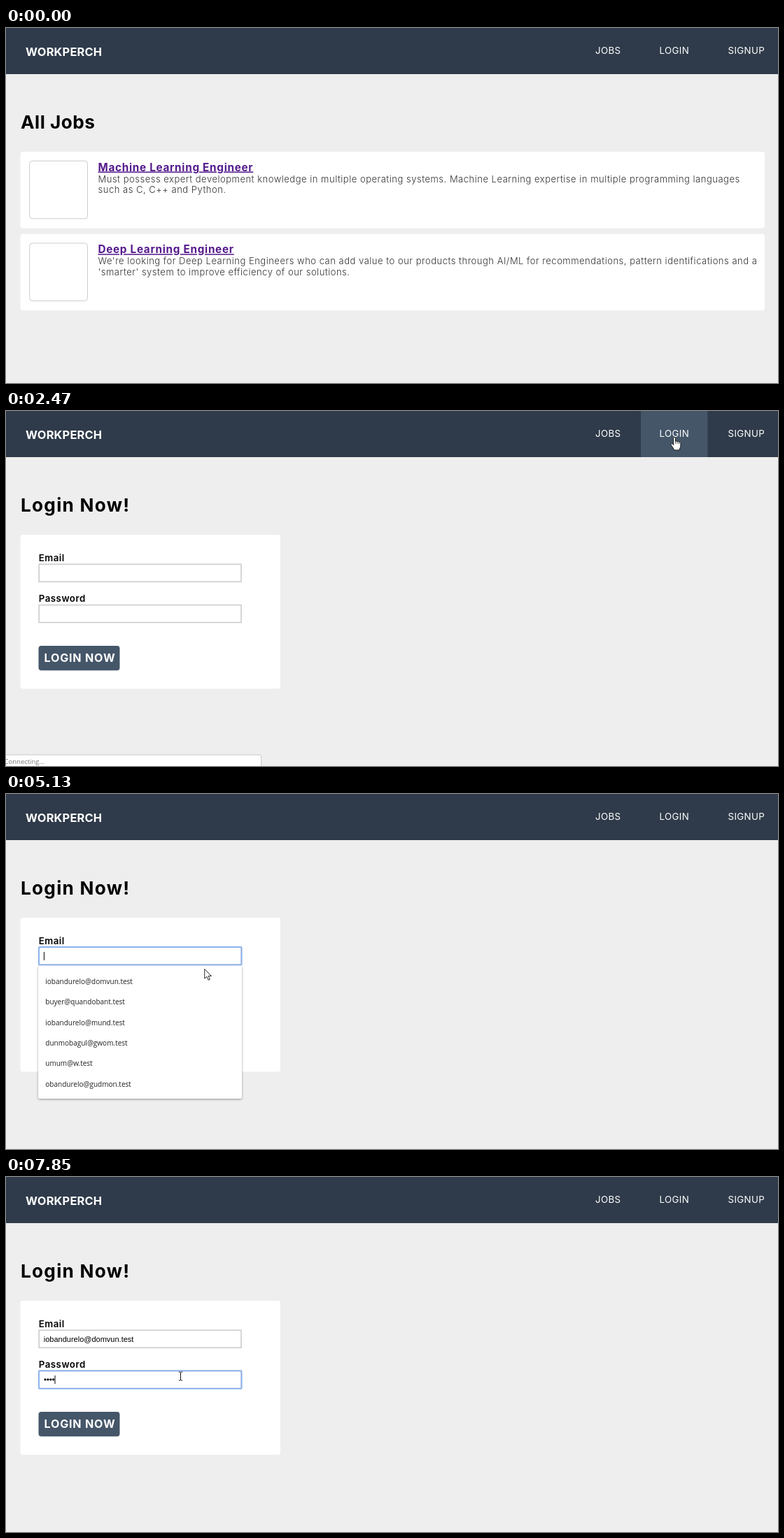
An HTML page that plays this animation: 1103x508 px, repeating every 8 s.

```html
<!DOCTYPE html>
<html lang="en">
<head>
<meta charset="utf-8">
<title>Job board login</title>
<style>
  html, body { margin: 0; width: 100%; height: 100%; overflow: hidden; background: #eee; }
  svg { display: block; width: 100%; height: 100%; font-family: Inter, "Open Sans", sans-serif; }
  .logo { font-size: 16.4px; font-weight: 700; letter-spacing: .2px; fill: #fff; }
  .nav { font-size: 13.3px; letter-spacing: .35px; fill: #fff; }
  .head { font-size: 26.2px; font-weight: 700; letter-spacing: .5px; }
  .wide { letter-spacing: 1.25px; }
  .title { font-size: 15.3px; font-weight: 700; letter-spacing: .7px; fill: #551a8b; text-decoration: underline; }
  .body { font-size: 13px; font-weight: 300; letter-spacing: .51px; fill: #333; }
  .label { font-size: 13.3px; font-weight: 600; letter-spacing: .5px; }
  .button { font-size: 16.1px; font-weight: 700; letter-spacing: .8px; fill: #fff; }
  .field { font: 11px "Liberation Sans", Arial, sans-serif; }
  .option { font: 10px "Open Sans", "Noto Sans", sans-serif; fill: #222; }
  .status { font: 9.5px "Open Sans", "Noto Sans", sans-serif; fill: #777; }
  #menu { filter: drop-shadow(0 1px 1.5px rgba(0, 0, 0, .4)); }
</style>
</head>
<body>
<svg id="stage" viewBox="0 0 1103 508"></svg>
<script>
const LOOP = 8000;
const STEP = 77; // pointer refresh while moving, ms
const EMAIL = "iobandurelo@domvun.test";
const OPTIONS = [EMAIL, "buyer@quandobant.test", "iobandurelo@mund.test",
  "dunmobagul@gwom.test", "umum@w.test", "obandurelo@gudmon.test"];

const rect = (x, y, w, h, fill, extra = "") =>
  `<rect x="${x}" y="${y}" width="${w}" height="${h}" fill="${fill}" ${extra}/>`;
const text = (x, y, cls, str) => `<text x="${x}" y="${y}" class="${cls}">${str}</text>`;
const group = (id, body) => `<g id="${id}">${body}</g>`;

const job = (y, title, first, second) =>
  rect(20.5, y, 1063.5, 109.5, "#fff", 'rx="4"') +
  rect(33.7, y + 13.2, 82.8, 82.6, "#fff", 'rx="4" stroke="#ccc"') +
  text(131.5, y + 27.5, "title", title) +
  text(131.5, y + 43.7, "body", first) +
  text(131.5, y + 59.4, "body", second);

const input = (y) => rect(47.2, y, 288.8, 25, "#fff", 'stroke="#ccc" stroke-width="1.6"');
const ring = (id, y) =>
  rect(47, y, 289.6, 25.6, "none", `id="${id}" rx="1" stroke="#8fb4f0" stroke-width="2"`);

// Red spelling squiggle between two x positions
function squiggle(from, to) {
  let d = `M${from} 237.8`;
  for (let x = from; x < to; x += 3) d += "l1.5-1.2 1.5 1.2";
  return `<path d="${d}" fill="none" stroke="#e33" stroke-width=".8"/>`;
}

const list = text(21, 144, "head", "All Jobs") +
  job(177, "Machine Learning Engineer",
    "Must possess expert development knowledge in multiple operating systems. Machine Learning expertise in multiple programming languages",
    "such as C, C++ and Python.") +
  job(294.7, "Deep Learning Engineer",
    "We're looking for Deep Learning Engineers who can add value to our products through AI/ML for recommendations, pattern identifications and a",
    "'smarter' system to improve efficiency of our solutions.");

const menu = rect(46, 245.5, 291, 190.5, "#fff", 'rx="2.5"') +
  rect(46, 253, 291, 29.4, "#e8e8e8", 'id="pick"') +
  OPTIONS.map((o, i) => text(56.3, 271.7 + 29.42 * i, "option", o)).join("");

const dots = [0, 1, 2, 3].map(i => `<circle cx="${56 + 3.9 * i}" cy="289.8" r="1.6"/>`).join("");

const login = text(21, 144, "head wide", "Login Now!") +
  rect(20.5, 177, 371.5, 220.5, "#fff", 'rx="4"') +
  text(46.7, 215, "label", "Email") + input(219.3) +
  text(46.7, 273, "label", "Password") + input(277.6) +
  rect(46.5, 336, 116, 35.3, "#455669", 'rx="4"') +
  text(54.5, 359, "button", "LOGIN NOW") +
  ring("emailRing", 219) + ring("passRing", 277.2) +
  group("value", text(53.8, 236, "field", EMAIL)) +
  group("spell", squiggle(54, 111) + squiggle(123, 161)) +
  group("dots", dots) + group("menu", menu) +
  '<path id="caret" stroke="#000"/>';

const pointers =
  group("arrow", '<path d="M0 0V13.5L3.2 10.7 5.4 15.7 7.5 14.8 5.4 9.9H9.7Z" fill="#fff" stroke="#111" stroke-width=".9"/>') +
  group("hand", `<path d="M-1.4 1.2C-1.4-.5 1.4-.5 1.4 1.2V6.2C1.8 5 3.8 5.2 4 6.6 4.6 5.6 6.3 6 6.5 7.2
    7.3 6.4 8.9 7 8.9 8.4V12.5C8.9 14.5 7.4 15.6 7.2 18.4H-.6C-.8 16-3.2 13.8-4.7 11.3
    -5.7 9.3-3.4 8.5-2.3 10L-1.4 11.2Z" fill="#fff" stroke="#111" stroke-width=".95"/>
    <path d="M1.4 6V9.3M4 6.6V9.5M6.5 7.2V9.8" stroke="#111" stroke-width=".7"/>`) +
  group("beam", '<path d="M-2.7-6H-.8L0-5.4.8-6H2.7M0-5.4V5.4M-2.7 6H-.8L0 5.4.8 6H2.7" fill="none" stroke="#111"/>');

document.getElementById("stage").innerHTML =
  rect(0, 0, 1103, 508, "#eee") +
  rect(0, 0, 1103, 66, "#2f3b4a") +
  rect(907, 0, 95.3, 66, "#455669", 'id="hover"') +
  text(28, 40, "logo", "WORKPERCH") +
  text(842, 36.7, "nav", "JOBS") + text(933.5, 36.7, "nav", "LOGIN") + text(1031.5, 36.7, "nav", "SIGNUP") +
  group("list", list) + group("login", login) +
  group("status",
    '<path d="M-2 492H361.5Q364.7 492 364.7 495V510H-2Z" fill="#fff" stroke="#c8c8c8"/>' +
    '<text id="statusText" x="-2.5" y="504.8" class="status"></text>') +
  pointers;

const ui = {};
document.querySelectorAll("[id]").forEach(el => ui[el.id] = el);
const show = (id, on) => { ui[id].style.display = on ? "" : "none"; };

// Each move curves from the previous rest point, bending towards "via"
const ENTRY = [1035, 508];
const moves = [
  { at: 450, steps: 4, via: [970, 360], to: [991, 199] },   // enter from below
  { at: 990, steps: 6, via: [955, 51], to: [955, 35] },     // up to the login link
  { at: 1550, steps: 2, to: [949, 29] },
  { at: 1780, steps: 1, to: [955, 37.5] },
  { at: 2640, steps: 5, via: [759, 127], to: [445, 259] },  // over to the form
  { at: 3110, steps: 7, via: [309, 256], to: [311, 229] },  // into the email field
  { at: 4890, steps: 7, via: [288, 256], to: [262, 254.5] },// to the first suggestion
  { at: 5610, steps: 1, to: [269, 257] },
  { at: 5750, steps: 1, to: [270.5, 263.5] },
  { at: 5910, steps: 4, to: [249.5, 285] }                  // down to the password field
];

function pointer(t) {
  let pos = ENTRY;
  for (const { at, steps, via, to } of moves) {
    if (t < at) break;
    const p = Math.min(1, Math.floor((t - at) / STEP + 1.2) / steps), q = 1 - p;
    pos = pos.map((from, i) => {
      const mid = via ? via[i] : (from + to[i]) / 2;
      return q * q * from + 2 * p * q * mid + p * p * to[i];
    });
  }
  return pos;
}

function draw(t) {
  const between = (a, b) => t >= a && t < b;
  const fade = (from, ms) => Math.min(1, Math.max(0, (t - from) / ms));

  show("list", t < 2470);
  show("login", t >= 2470);
  show("hover", between(1300, 2720));
  ui.status.style.opacity = fade(1520, 100) - fade(2640, 160);
  ui.statusText.textContent = t < 2010 ? "pagehost:4000/login" : "Connecting...";

  show("emailRing", between(3880, 6310));
  show("passRing", t >= 6310);
  show("menu", between(3970, 5750));
  show("pick", between(5190, 5750));
  show("value", t >= 5750);
  show("spell", between(5750, 6310));

  const typed = [7080, 7380, 7680, 7850].filter(key => t >= key).length;
  [...ui.dots.children].forEach((dot, i) => { dot.style.display = i < typed ? "" : "none"; });

  const inPassword = t >= 6310;
  const caretX = inPassword ? 54.4 + 3.9 * typed : t < 5750 ? 54.4 : 182.6;
  ui.caret.setAttribute("d", `M${caretX} ${inPassword ? 284 : 226}v12`);
  show("caret", t >= 3970 && !between(4430, 4890) && !between(5360, 5750) && !between(6920, 7080));

  const kind = between(1200, 2640) ? "hand" : between(3340, 5040) || t >= 5980 ? "beam" : "arrow";
  for (const id of ["arrow", "hand", "beam"]) show(id, t >= 450 && id === kind);
  ui[kind].setAttribute("transform", `translate(${pointer(t)})`);
}

const start = performance.now();
function tick() {
  draw((performance.now() - start) % LOOP);
  requestAnimationFrame(tick);
}
tick();
</script>
</body>
</html>
```
